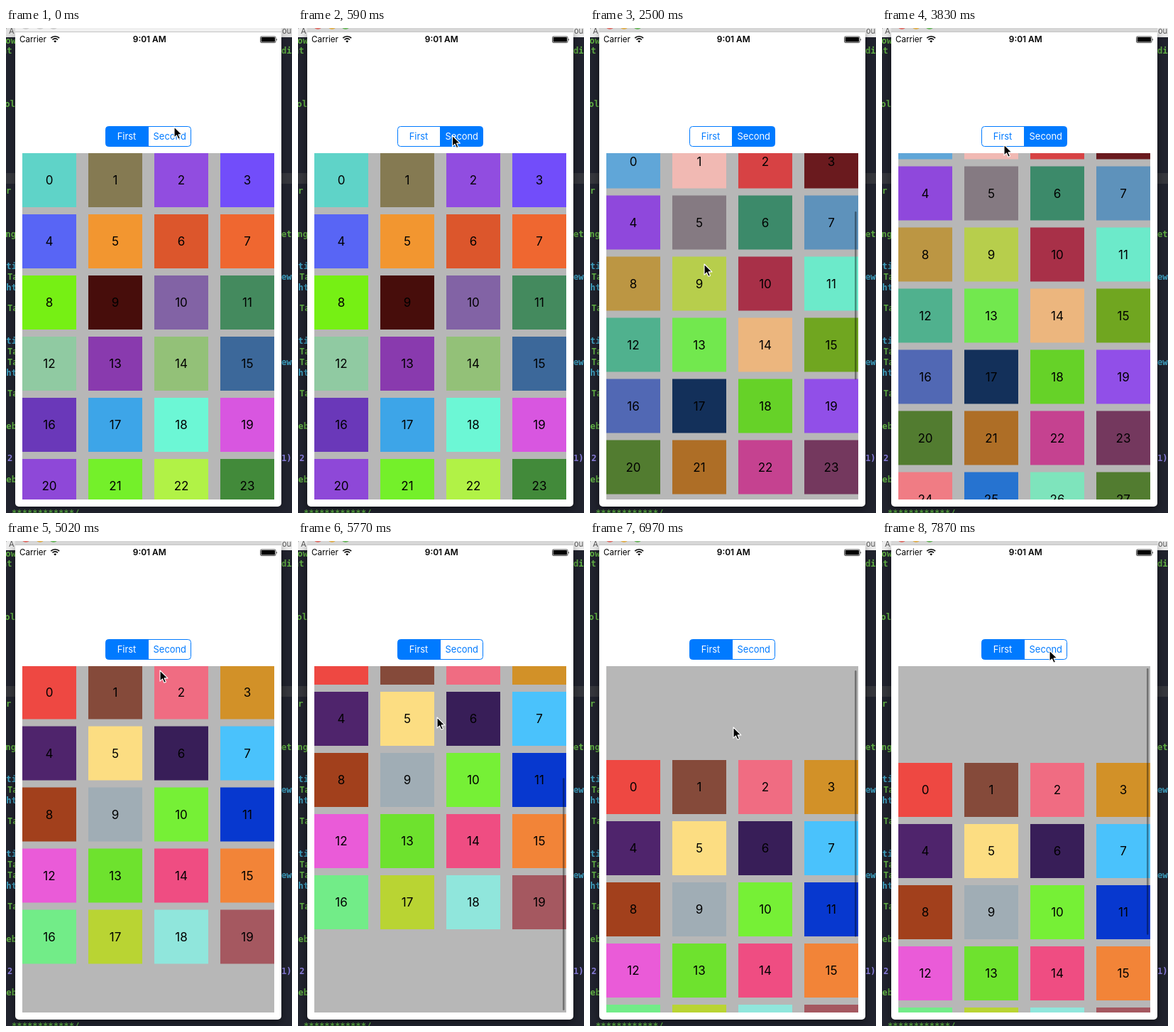
Animation, 403 px wide and 682 px high, one loop 8000 ms. Source, as an HTML page:

```html
<!DOCTYPE html>
<html lang="en">
<head>
<meta charset="utf-8">
<title>Segmented grid</title>
<style>
  html, body { margin: 0; width: 100%; height: 100%; overflow: hidden; background: #21232e; }
  svg { display: block; }
  text { font-family: Inter, "Open Sans", sans-serif; }
  .code text { font: bold 12.2px "DejaVu Sans Mono", monospace; fill: #62b245; white-space: pre; }
  .code .type { fill: #3fa3c4; }
  .code .num { fill: #8b7fe0; }
  .code .bar { font: 11px Inter, sans-serif; fill: #555; }
  .tile text { font-size: 17px; text-anchor: middle; }
  .seg text { font-size: 12.9px; text-anchor: middle; }
</style>
</head>
<body>
<svg id="stage" width="403" height="682" viewBox="0 0 403 682">
  <defs>
    <filter id="blur" x="-20%" y="-20%" width="140%" height="140%"><feGaussianBlur stdDeviation="6"/></filter>
    <clipPath id="pill"><rect x="140.5" y="138.5" width="120" height="28" rx="4"/></clipPath>
  </defs>

  <rect width="403" height="682" fill="#21232e"/>
  <rect id="toolbar" width="403" height="13"/>
  <rect y="204" width="403" height="15" fill="#36373d"/>
  <g class="code" id="code"></g>
  <rect id="shadow" x="13" y="8" width="375" height="668" rx="5" filter="url(#blur)"/>
  <text x="8" y="686" style="font: bold 12.2px 'DejaVu Sans Mono', monospace" fill="#4f9a3a">************/</text>

  <path d="M13 0H388V668a5 5 0 0 1-5 5H18a5 5 0 0 1-5-5Z" fill="#fff"/>
  <rect id="title" x="13" width="375" height="5.5"/>
  <path d="M13 5.5H388" stroke="#c4c4c4"/>
  <g id="lights"><circle cx="28" cy="-4" r="6"/><circle cx="48" cy="-4" r="6"/><circle cx="67" cy="-4" r="6"/></g>

  <text x="19" y="20.3" font-size="11.6">Carrier</text>
  <g fill="none" stroke="#000" stroke-width="1.7">
    <path d="M63.3 14.2a8.3 8.3 0 0 1 11.8 0M65.5 16.5a5.2 5.2 0 0 1 7.4 0"/>
    <path d="M69.2 20.6L67.3 18.4a2.7 2.7 0 0 1 3.8 0Z" fill="#000" stroke="none"/>
  </g>
  <text x="202.3" y="20.3" font-size="11.9" font-weight="600" text-anchor="middle">9:01 AM</text>
  <rect x="358.5" y="12" width="21.5" height="8.6" rx="1.6" fill="none" stroke="#000" stroke-width=".7"/>
  <rect x="359.6" y="13.1" width="19.3" height="6.4" rx=".6"/>
  <path d="M381 14.7q1.8 1.6 0 3.2Z"/>

  <g class="seg">
    <g clip-path="url(#pill)" fill="#007aff">
      <rect id="fill0" x="140" y="138" width="60.5" height="29"/>
      <rect id="fill1" x="200.5" y="138" width="61" height="29"/>
    </g>
    <path d="M200.5 138.5v28" stroke="#007aff"/>
    <rect x="140.5" y="138.5" width="120" height="28" rx="4" fill="none" stroke="#007aff"/>
    <text id="label0" x="170" y="157.2">First</text>
    <text id="label1" x="230.8" y="157.2">Second</text>
  </g>

  <svg x="23" y="176" width="355" height="487" overflow="hidden">
    <rect width="355" height="487" fill="#b7b7b7"/>
    <g id="grid"></g>
    <rect id="thumb" x="350" width="2.6" rx="1.3" fill="#000"/>
  </svg>

  <path id="cursor" d="M0 0V15.2L3.5 11.9L5.9 17.3L8.5 16.2L6.1 10.9H10.9Z"
        stroke="#fff" stroke-width="1.1" stroke-linejoin="round"/>
</svg>

<script>
const NS = "http://www.w3.org/2000/svg";
const LOOP = 8000;
const $ = id => document.getElementById(id);

function add(parent, tag, attrs, text) {
  const el = document.createElementNS(NS, tag);
  for (const name in attrs) el.setAttribute(name, attrs[name]);
  if (text !== undefined) el.textContent = text;
  return parent.appendChild(el);
}

const set = (id, attrs) => {
  for (const name in attrs) $(id).setAttribute(name, attrs[name]);
};

// Slivers of the editor on both sides: x, baseline, text, style
[
  [-3, 8, "/ A", "bar"], [389, 8, "ource", "bar"],
  [-8, 22, "tow", ""], [-6, 36, "nt", ""], [388, 36, "di", ""],
  [-9, 111, "tol", ""], [0, 233, "r", ""],
  [-8, 294, "ing", ""], [388, 294, "et", ""],
  [-7, 339, "cti", "type"], [2, 354, "Ta", ""], [388, 354, "ew", "type"], [-7, 369, "ght", "type"],
  [2, 398, "Ta", ""],
  [-7, 444, "cti", "type"], [2, 459, "Ta", ""], [-7, 489, "ght", "type"], [388, 474, "ew", "type"],
  [2, 474, "Ta", ""], [2, 518, "Ta", ""],
  [-7, 564, "leb", ""], [2, 609, "2", "num"], [388, 609, "1)", "num"], [-7, 639, "leb", ""]
].forEach(([x, y, text, style]) => add($("code"), "text", { x, y, class: style }, text));

const palettes = [
  `5fd3c8 857a52 914de0 724dfa 5865f5 f29630 dc562c ef6730 76f014 470d0b 8263a5 448a5e
   90caa2 893aae 93c178 3c689a 6a38b9 3da5e8 6cf7d5 d856e0 8e48d8 74f02a b1f246 428a3a`,
  `65ae7b dc4453 de4730 1f170a 85721f 98485e 2f40e0 53540f adf0fb c08f8a 5b182e a8e4a4
   3544b8 755cd6 b2701f 55aafb dc4453 a0dbe9 82f2ba d1587e`,
  `60a6d8 f1b9b3 d74244 6a1a1e 8f48dc 857a82 3c8a6a 5e92bb bc9643 b7ce4c a83048 6ceaca
   50b18e 72e84e ecb67e 70a620 5168b4 13305a 66d228 914fe8 527c30 ae6e26 c54290 74385e
   f07c84 2673d0 7ee4bc 527c30`,
  `ee4842 854a3a f06c82 d29128 4f246c fcdd82 381e58 4ac2fc a2401c a0adb5 76f036 0738cf
   ea5bd8 6ee22e ef4d82 f28438 72ec88 b9d433 90e6dc a55860`
];

const pages = palettes.map(list => {
  const page = add($("grid"), "g", { class: "tile" });
  list.trim().split(/\s+/).forEach((color, i) => {
    const x = i % 4 * 93, y = Math.floor(i / 4) * 86;
    add(page, "rect", { x, y, width: 76, height: 76, fill: "#" + color });
    add(page, "text", { x: x + 38, y: y + 44.2 }, i);
  });
  return page;
});

// Tracks: [tick, value, ...], linear between ticks
const cursorTrack = [
  [0, 237, 139], [3, 234, 150], [7, 168, 155], [10, 168, 155], [12, 226, 153], [13, 222, 156],
  [15, 161, 332], [21, 161, 332], [24, 165, 116], [26, 172, 164], [27, 171, 150], [28, 171, 144],
  [29, 171, 144], [31, 224, 160], [33, 224, 160], [37, 196, 248], [39, 196, 248], [43, 202, 262],
  [49, 202, 262], [53, 236, 154]
];
const scrollTrack = [
  [16, 0], [17, 26.5], [18, 55], [19, 67.5], [26, 67.5], [27, 1.5], [36, 1.5], [38, 62],
  [39, 50], [40, 28], [41, 14], [42, 7], [43, 3], [44, 1.5], [45, -60], [47, -132],
  [48, -136], [49, -136], [50, -146], [52, -138], [53, -136]
];
const segTrack = [
  [0, 0], [1, 1], [8, 1], [9, 0.2], [10, 0], [12, 0], [13, 0.8], [14, 1], [26, 1], [27, 0.2], [28, 0]
];
const thumbTrack = [[16, 0], [17, 1], [20, 1], [23, 0], [36, 0], [37, 1]];

function sample(track, k) {
  const i = track.findIndex(key => key[0] > k);
  if (i === 0) return track[0].slice(1);
  if (i < 0) return track[track.length - 1].slice(1);
  const a = track[i - 1], b = track[i];
  const p = (k - a[0]) / (b[0] - a[0]);
  return a.slice(1).map((v, j) => v + (b[j + 1] - v) * p);
}

const tickAt = t => t < 4570 ? Math.floor((t + 10) / 147.33) : 31 + Math.floor((t - 4570) / 150);

const labelColor = v => `rgb(${255 * v},${122 + 133 * v},255)`;

function drawThumb(scroll, page, opacity) {
  const view = 487, track = 481, inset = 136;
  const total = page === 3 ? 625 : 990;
  const pos = scroll + inset, max = total - view;
  const over = Math.max(0, -pos, pos - max);
  const height = view / total * track - over;
  const y = 3 + (pos > max ? track - height : Math.max(0, pos) / total * track);
  set("thumb", { y, height, opacity: opacity * 0.38 });
}

function draw(k) {
  const page = k < 9 ? 0 : k < 13 ? 1 : k < 27 ? 2 : 3;
  pages.forEach((el, i) => el.setAttribute("display", i === page ? "inline" : "none"));

  const [scroll] = sample(scrollTrack, k);
  set("grid", { transform: `translate(0 ${-scroll})` });
  drawThumb(scroll, page, sample(thumbTrack, k)[0]);

  const [second] = sample(segTrack, k);
  [1 - second, second].forEach((v, i) => {
    set("fill" + i, { opacity: v });
    set("label" + i, { fill: labelColor(v) });
  });

  const [x, y] = sample(cursorTrack, k);
  set("cursor", { transform: `translate(${x} ${y})` });

  const active = k > 0;
  set("toolbar", { fill: active ? "#ececec" : "#dedede" });
  set("title", { fill: active ? "#d6d6d6" : "#f0f0f0" });
  set("shadow", { opacity: active ? 0.5 : 0.3 });
  [...$("lights").children].forEach((dot, i) =>
    dot.setAttribute("fill", active ? ["#e0736c", "#e0b050", "#6cb860"][i] : "#cfcfcf"));
}

let last = -1;
function loop() {
  const k = tickAt(performance.now() % LOOP);
  if (k !== last) draw(last = k);
  requestAnimationFrame(loop);
}
loop();
</script>
</body>
</html>
```
